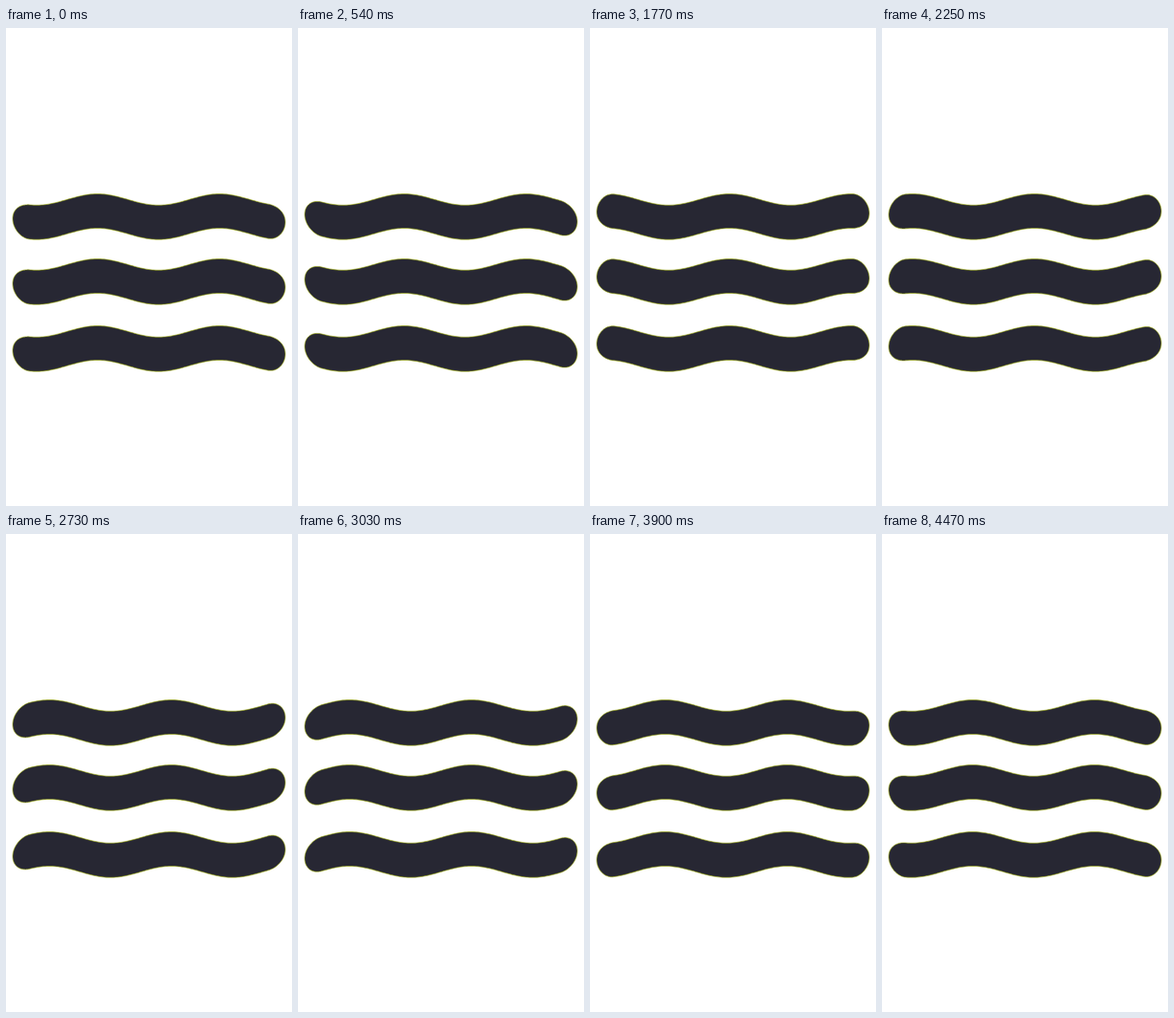
Write an HTML page with a canvas that moves like this. It is 300x500 px and loops after 4.5 s.

```html
<!DOCTYPE html>
<html>
<head>
<meta charset="utf-8">
<style>
  html, body { margin: 0; width: 100%; height: 100%; overflow: hidden; background: #fff; }
  canvas { display: block; }
</style>
</head>
<body>
<canvas id="stage" width="300" height="500"></canvas>
<script>
const ctx = document.getElementById('stage').getContext('2d');
const LOOP = 4500, STEP = 30;
const LEFT = 7, RIGHT = 293, RADIUS = 18;
const WAVELENGTH = 128, AMPLITUDE = 5.9, CREST = 96;
const ROWS = [197.4, 265.4, 335.4];

// A pill whose points are shifted vertically by a travelling wave.
function barPath(centerY, phase) {
  const path = new Path2D();
  const point = (x, dy) => {
    const wave = -AMPLITUDE * Math.cos(2 * Math.PI * ((x - CREST) / WAVELENGTH - phase));
    path.lineTo(x, centerY + dy + wave);
  };
  const cap = (cx, start) => {
    for (let i = 0; i <= 48; i++) {
      const a = start + Math.PI * i / 48;
      point(cx + RADIUS * Math.cos(a), RADIUS * Math.sin(a));
    }
  };
  const x0 = LEFT + RADIUS, x1 = RIGHT - RADIUS;
  for (let x = x0; x < x1; x += 2) point(x, -RADIUS);
  cap(x1, -Math.PI / 2);
  for (let x = x1; x > x0; x -= 2) point(x, RADIUS);
  cap(x0, Math.PI / 2);
  path.closePath();
  return path;
}

function draw(ms) {
  const phase = Math.floor(ms % LOOP / STEP) * STEP / LOOP;
  ctx.fillStyle = '#fff';
  ctx.fillRect(0, 0, 300, 500);
  ctx.fillStyle = '#272733';
  ctx.strokeStyle = 'rgba(165, 180, 10, 0.65)';
  ctx.lineWidth = 0.9;
  for (const y of ROWS) {
    const bar = barPath(y, phase);
    ctx.fill(bar);
    ctx.stroke(bar);
  }
}

const start = performance.now();
function tick() {
  draw(performance.now() - start);
  requestAnimationFrame(tick);
}
tick();
</script>
</body>
</html>
```
